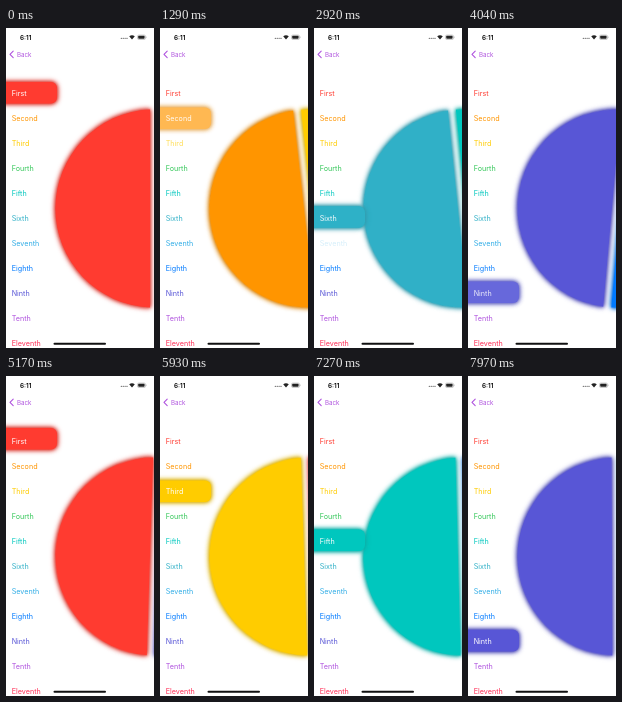
An HTML page that plays this animation: 148 px wide and 320 px high, repeating every 8 s.

```html
<!DOCTYPE html>
<html lang="en">
<head>
<meta charset="utf-8">
<title>Colour wheel menu</title>
<style>
  html, body { margin: 0; width: 100%; height: 100%; overflow: hidden; background: #fff; }
  svg { display: block; width: 100%; height: 100%; }
  text { font-family: Inter, Roboto, sans-serif; }
  .row { font-size: 7.2px; }
  .glow { filter: drop-shadow(0 0 2.6px var(--shade)) drop-shadow(0 0 1.6px var(--shade)); }
</style>
</head>
<body>
<svg viewBox="0 0 148 320" preserveAspectRatio="none">
  <g id="wheel">
    <path class="half glow" d="M-4-98.9A99 99 0 0 0-4 98.9Z"/>
    <path class="half glow" d="M-4-98.9A99 99 0 0 0-4 98.9Z" transform="rotate(180)"/>
  </g>
  <rect id="pill" class="glow" x="-12" y="-10.8" width="63" height="21.6" rx="6"/>
  <g id="list"></g>

  <text x="14" y="11.7" font-size="6.3" font-weight="600">6:11</text>
  <g fill="#222">
    <circle cx="115.3" cy="10.3" r=".55"/><circle cx="117.2" cy="10.3" r=".55"/>
    <circle cx="119.1" cy="10.3" r=".55"/><circle cx="121" cy="10.3" r=".55"/>
    <path d="M123.2 8.3Q126 6 128.8 8.3L126 11.6Z"/>
    <rect x="131.5" y="7.1" width="8" height="4.4" rx="1.3" fill="none" stroke="#999" stroke-width=".5"/>
    <rect x="132.2" y="7.8" width="6.4" height="3" rx=".7"/>
    <path d="M140.2 8.5v1.6" stroke="#999" stroke-width=".5"/>
  </g>
  <path d="M7.2 23.2L4 26.4l3.2 3.2" fill="none" stroke="#af52de" stroke-width="1.1" stroke-linecap="round" stroke-linejoin="round"/>
  <text x="11" y="28.6" font-size="6.2" fill="#af52de">Back</text>
  <rect x="47.5" y="314.8" width="52.5" height="2" rx="1" fill="#111"/>
</svg>
<script>
const LOOP = 8000;
const items = [
  ['First', '#ff3b30'], ['Second', '#ff9500'], ['Third', '#ffcc00'], ['Fourth', '#34c759'],
  ['Fifth', '#00c7be'], ['Sixth', '#30b0c7'], ['Seventh', '#32ade6'], ['Eighth', '#007aff'],
  ['Ninth', '#5856d6'], ['Tenth', '#af52de'], ['Eleventh', '#ff2d55']
].map(([name, hex]) => ({ name, rgb: [1, 3, 5].map(i => parseInt(hex.slice(i, i + 2), 16)) }));

// Taps: time, item index, how long the pressed dimming lingers
const taps = [
  [925, 1, 60], [1270, 2, 60], [1615, 3, 480], [2110, 4, 60], [2592, 5, 60],
  [2985, 6, 60], [3345, 7, 60], [3703, 8, 450], [4683, 0, 60], [5450, 2, 60],
  [6285, 7, 60], [6715, 4, 60], [7582, 8, 60]
].map(([time, item, fade]) => ({ time, item, fade }));
const PRESS = 90;

const $ = id => document.getElementById(id);
const wheel = $('wheel'), pill = $('pill');
const halves = [...document.querySelectorAll('.half')];
const rowY = i => 65 + 25 * i;
const clamp = v => Math.min(1, Math.max(0, v));
const mix = (a, b, k) => a.map((v, i) => v + (b[i] - v) * k);
const css = c => `rgb(${c.map(Math.round).join(',')})`;
const WHITE = [255, 255, 255], SHADOW = [60, 60, 60];

const rows = items.map((item, i) => {
  const label = document.createElementNS('http://www.w3.org/2000/svg', 'text');
  label.setAttribute('class', 'row');
  label.setAttribute('x', 5.7);
  label.setAttribute('y', rowY(i) + 2.5);
  label.textContent = item.name;
  $('list').append(label);
  return label;
});

// Step response of a spring with response 0.55 s and damping fraction 0.825
function spring(ms) {
  if (ms <= 0) return 0;
  const t = ms / 1000, w = 2 * Math.PI / 0.55, z = 0.825;
  const d = w * Math.sqrt(1 - z * z);
  return 1 - Math.exp(-z * w * t) * (Math.cos(d * t) + z * w / d * Math.sin(d * t));
}

function paint(el, rgb) {
  el.style.fill = css(rgb);
  el.style.setProperty('--shade', css(mix(rgb, SHADOW, 0.18)));
}

function pressOpacity(tap, t) {
  const dt = t - tap.time;
  if (dt < -PRESS || dt > tap.fade) return 1;
  return dt < 0 ? 0.2 : 0.2 + 0.8 * Math.sqrt(dt / tap.fade);
}

function draw(t) {
  let angle = 0, y = rowY(0), selected = 0, color = items[0].rgb;
  const weight = items.map((_, i) => i ? 0 : 1);
  const dim = items.map(() => 1);
  const sides = [items[0].rgb, null];

  taps.forEach((tap, n) => {
    dim[tap.item] = Math.min(dim[tap.item], pressOpacity(tap, t));
    if (t < tap.time) return;
    const p = spring(t - tap.time), k = clamp(p);
    angle += (n % 2 ? -180 : 180) * p;
    y += (rowY(tap.item) - rowY(selected)) * p;
    weight.forEach((w, i) => weight[i] = w + ((i === tap.item) - w) * k);
    color = mix(color, items[tap.item].rgb, k);
    sides[(n + 1) % 2] = items[tap.item].rgb;
    selected = tap.item;
  });

  wheel.setAttribute('transform', `translate(148 180.5) rotate(${angle})`);
  halves.forEach((half, i) => {
    half.style.display = sides[i] ? '' : 'none';
    if (sides[i]) paint(half, sides[i]);
  });
  pill.setAttribute('transform', `translate(0 ${y - 0.2})`);
  pill.style.opacity = dim[selected];
  paint(pill, color);
  rows.forEach((row, i) => {
    row.style.fill = css(mix(items[i].rgb, WHITE, weight[i]));
    row.style.opacity = dim[i];
  });
}

const start = performance.now();
function tick() {
  draw((performance.now() - start) % LOOP);
  requestAnimationFrame(tick);
}
tick();
</script>
</body>
</html>
```
